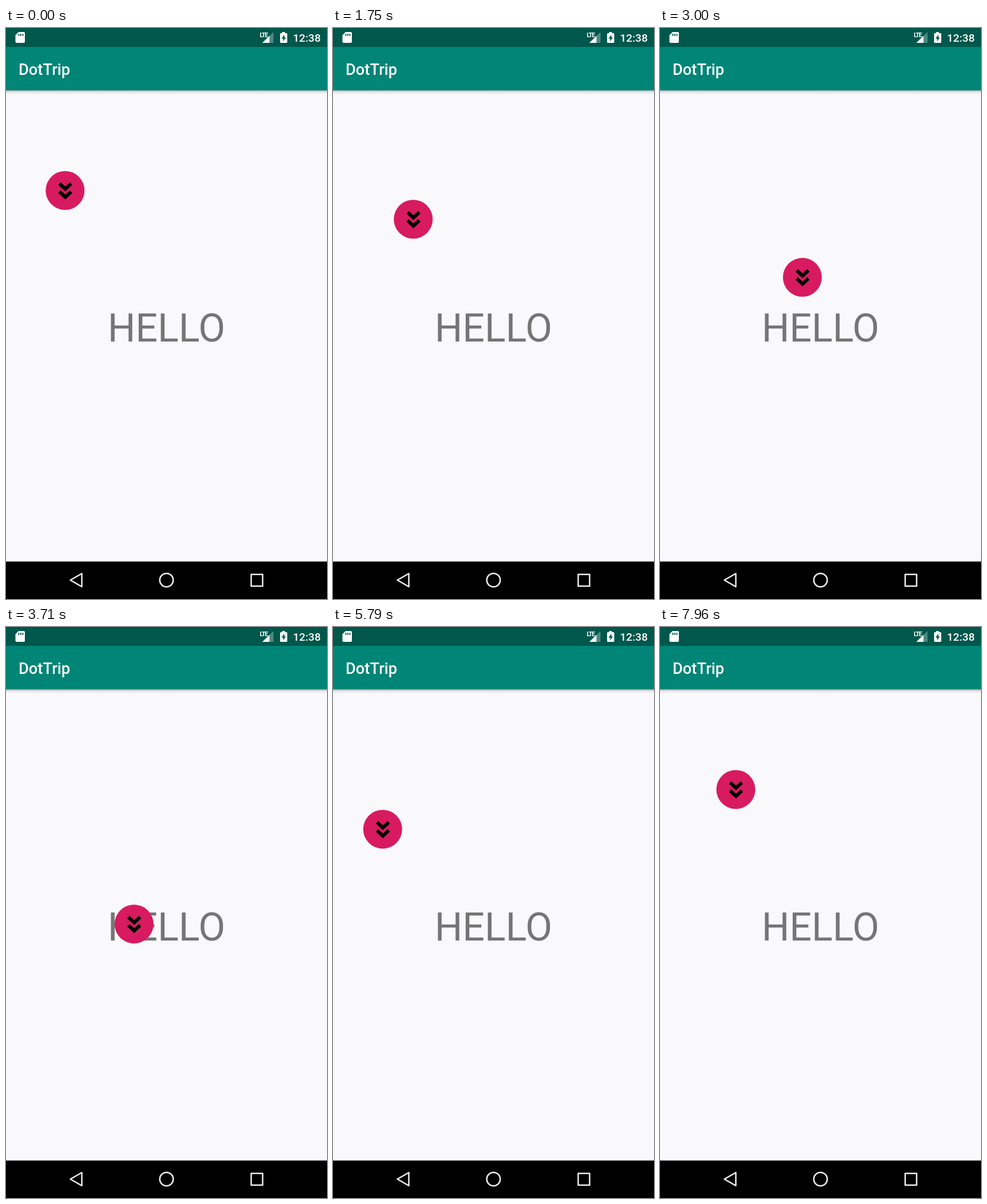
An HTML page that plays this animation: 561x998 px, repeating every 8000 ms.

```html
<!DOCTYPE html>
<html lang="en">
<head>
<meta charset="utf-8">
<title>Drag button</title>
<style>
  html, body { margin: 0; width: 100%; height: 100%; overflow: hidden; background: #f9f9fb; }
  svg { display: block; width: 100%; height: 100%; font-family: Roboto, sans-serif; }
  .medium { font-weight: 500; fill: #fff; }
  .lte { font: 700 10.5px Roboto, sans-serif; letter-spacing: -1.2px; fill: #fff; }
</style>
</head>
<body>
<svg viewBox="0 0 561 998">
  <defs>
    <linearGradient id="shadow" x2="0" y2="1">
      <stop stop-color="#000" stop-opacity=".3"/>
      <stop offset=".4" stop-color="#000" stop-opacity=".09"/>
      <stop offset="1" stop-color="#000" stop-opacity="0"/>
    </linearGradient>
  </defs>
  <rect width="561" height="998" fill="#f9f9fb"/>
  <rect y="109" width="561" height="7" fill="url(#shadow)"/>
  <rect y="33" width="561" height="76" fill="#008577"/>
  <rect width="561" height="33" fill="#00574b"/>

  <!-- Status icons -->
  <path d="M22 7H31Q33 7 33 9V24Q33 26 31 26H18.500Q16.500 26 16.500 24V12.500Z" fill="#fff"/>
  <path d="M22.500 10V14M26 10V14M29.500 10V14" stroke="#00574b" stroke-width="1.800"/>
  <path d="M448 26L467.500 7V26Z" fill="#fff" opacity=".3"/>
  <path d="M448 26L460.500 13.800V26Z" fill="#fff"/>
  <text class="lte" x="443.500" y="16">LTE</text>
  <path d="M482.500 7H487.500V9H490Q491.500 9 491.500 10.500V24.500Q491.500 26 490 26H480.500Q479 26 479 24.500V10.500Q479 9 480.500 9H482.500Z" fill="#fff"/>
  <path d="M486.500 11.500L481.500 18.500H484.500V23.500L489 16.500H486.500Z" fill="#00574b"/>
  <text class="medium" x="550" y="24" font-size="19.100" text-anchor="end">12:38</text>

  <text class="medium" x="22" y="81.500" font-size="27.300">DotTrip</text>
  <text x="280.500" y="548" font-size="68.200" text-anchor="middle" fill="#757575">HELLO</text>

  <g id="button">
    <circle r="34" fill="#d81b60"/>
    <path d="M-10 -12.200L0.300 -2.700L10.600 -12.200M-10 2L0.300 11.500L10.600 2" fill="none" stroke="#000" stroke-width="6.200"/>
  </g>

  <rect y="932.500" width="561" height="65.500"/>
  <g fill="none" stroke="#eee" stroke-width="2.500" stroke-linejoin="round">
    <path d="M112.500 965L132.500 953.500V976.500Z"/>
    <circle cx="280.500" cy="965" r="11.800"/>
    <rect x="428.500" y="955" width="20" height="20.500"/>
  </g>
</svg>
<script>
  const LOOP = 8000;
  const button = document.getElementById("button");

  // Drag path: time, x, y
  const path = [
    [0, 103.3, 284], [900, 103.3, 284], [1750, 140.2, 334.2], [3000, 248.8, 435.7],
    [3710, 223.8, 519.2], [5790, 86.8, 353.5], [7960, 132.5, 284]
  ];

  const slope = (i, axis) => (path[i + 1][axis] - path[i][axis]) / (path[i + 1][0] - path[i][0]);

  // Monotone tangents keep the curve from overshooting its points.
  function tangent(i, axis) {
    if (i === 0 || i === path.length - 1) return 0;
    const before = slope(i - 1, axis), after = slope(i, axis);
    return before * after <= 0 ? 0 : 2 * before * after / (before + after);
  }

  function position(time, axis) {
    const last = path.length - 1;
    if (time >= path[last][0]) return path[last][axis];
    const i = path.findIndex(point => point[0] > time) - 1;
    const span = path[i + 1][0] - path[i][0];
    const u = (time - path[i][0]) / span;
    const ease = u * u * (3 - 2 * u);
    return path[i][axis] * (1 - ease) + path[i + 1][axis] * ease
      + span * u * (1 - u) * ((1 - u) * tangent(i, axis) - u * tangent(i + 1, axis));
  }

  function draw() {
    const time = performance.now() % LOOP;
    button.setAttribute("transform", `translate(${position(time, 1)} ${position(time, 2)})`);
    requestAnimationFrame(draw);
  }
  draw();
</script>
</body>
</html>
```
